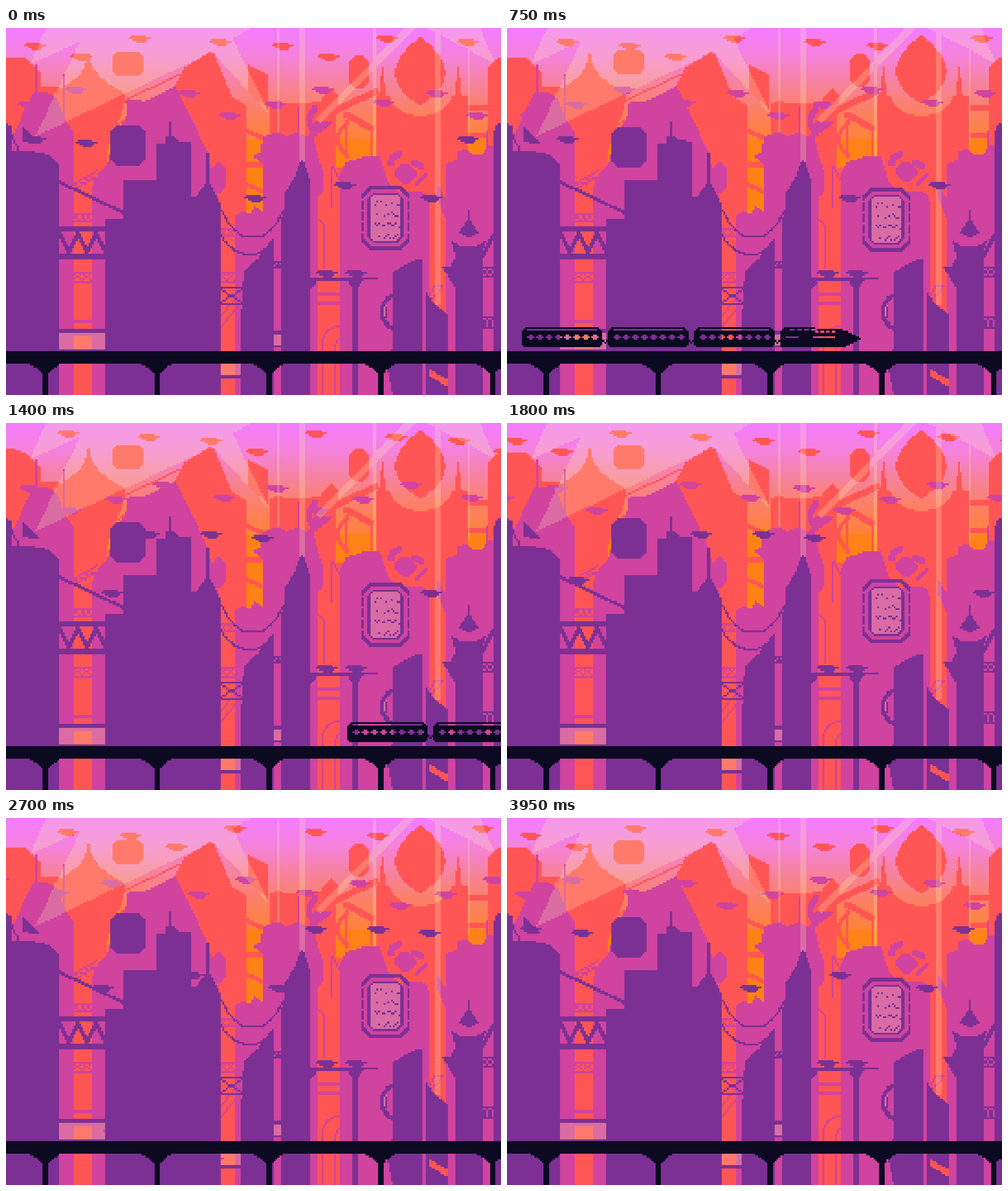
Recreate the animation shown at these times as an HTML page with a canvas. Size 869 px wide and 644 px high, loop 4000 ms.

```html
<!DOCTYPE html>
<html lang="en">
<head>
<meta charset="utf-8">
<title>Sunset city</title>
<style>
html, body { margin: 0; width: 100%; height: 100%; overflow: hidden; background: #7c3094; }
canvas { display: block; width: 100vw; height: 100vh; image-rendering: pixelated; }
</style>
</head>
<body>
<canvas id="stage" width="270" height="200"></canvas>
<script>
// Shapes use stage pixels; P is the size of one art pixel.
const W = 270, H = 200, P = 3.2195, LOOP = 4000, TICK = 50, BOTTOM = 644;
const RED = '#ff5555', PINK = '#d0439f', PURPLE = '#7c3094', BLACK = '#0c0a20';
const view = document.getElementById('stage').getContext('2d');
let g = view;

const px = v => Math.round(v / P);

function layer(color, paint, w = W, h = H) {
  const cv = document.createElement('canvas');
  cv.width = w; cv.height = h;
  g = cv.getContext('2d');
  g.fillStyle = color;
  paint();
  g = view;
  return cv;
}

function carve(paint) {
  g.globalCompositeOperation = 'destination-out';
  paint();
  g.globalCompositeOperation = 'source-over';
}

// Hard-edged polygon fill
function poly(...p) {
  const n = p.length;
  for (let j = 0; j < H; j++) {
    const y = (j + .5) * P, xs = [];
    for (let i = 0; i < n; i += 2) {
      const x1 = p[i], y1 = p[i + 1], x2 = p[(i + 2) % n], y2 = p[(i + 3) % n];
      if ((y1 <= y) !== (y2 <= y)) xs.push(x1 + (y - y1) * (x2 - x1) / (y2 - y1));
    }
    xs.sort((a, b) => a - b);
    for (let k = 0; k + 1 < xs.length; k += 2) {
      const a = px(xs[k]), b = px(xs[k + 1]);
      if (b > a) g.fillRect(a, j, b - a, 1);
    }
  }
}

// Skyline that runs down to the bottom of the stage
const ridge = (...p) => poly(p[0], BOTTOM, ...p, p[p.length - 2], BOTTOM);

function box(x1, y1, x2, y2 = BOTTOM) {
  const a = px(x1), b = px(y1);
  g.fillRect(a, b, Math.max(1, px(x2) - a), Math.max(1, px(y2) - b));
}

// Symmetric shape; half(v) is its half width from top (v = 0) to foot (v = 1)
function profile(cx, y1, y2, half) {
  for (let j = px(y1); j < px(y2); j++) {
    const h = half(((j + .5) * P - y1) / (y2 - y1)), a = px(cx - h);
    g.fillRect(a, j, px(cx + h) - a, 1);
  }
}

function octagon(x1, y1, x2, y2, c) {
  const w = (x2 - x1) / 2, h = y2 - y1;
  profile(x1 + w, y1, y2, v => w - Math.max(0, c - Math.min(v, 1 - v) * h));
}

function line(w, ...p) {
  const mid = (w - 1) / 2;
  for (let i = 0; i + 3 < p.length; i += 2) {
    const x = p[i] / P, y = p[i + 1] / P, dx = p[i + 2] / P - x, dy = p[i + 3] / P - y;
    const n = Math.ceil(Math.max(Math.abs(dx), Math.abs(dy))) || 1;
    for (let k = 0; k <= n; k++)
      g.fillRect(Math.floor(x - mid + dx * k / n), Math.floor(y - mid + dy * k / n), w, w);
  }
}

function brace(x1, y1, x2, y2, n = 2) {
  box(x1, y1, x2, y1 + 3);
  box(x1, y2 - 3, x2, y2);
  const s = (x2 - x1) / n;
  for (let a = x1; a < x2 - 1; a += s) {
    line(1, a, y1 + 3, a + s - 2, y2 - 4);
    line(1, a, y2 - 4, a + s - 2, y1 + 3);
  }
}

function curve(w, n, at) {
  line(w, ...Array.from({ length: n + 1 }, (_, i) => at(i / n)).flat());
}

function cable(x1, y1, x2, y2, drop) {
  curve(1, 24, u => [x1 + (x2 - x1) * u, y1 + (y2 - y1) * u + drop * (1 - Math.abs(2 * u - 1) ** 2.5)]);
}

function hull(x, y) {
  g.fillRect(x + 1, y, 8, 1);
  g.fillRect(x, y + 1, 12, 1);
  g.fillRect(x + 2, y + 2, 8, 1);
  g.fillRect(x + 4, y + 3, 5, 1);
}

const moor = (cx, cy) => hull(px(cx) - 6, px(cy) - 2);

// Each ship repeats every `gap` art pixels, so the fleet loops seamlessly.
function fleet(ships, gap, move) {
  for (const [cx, cy] of ships) {
    const first = (px(cx) + Math.round(move)) % gap - gap;
    for (let x = first; x < W + 6; x += gap) hull(x - 6, px(cy) - 2);
  }
}

const sky = layer('#ff8216', () => {
  const end = px(197), grad = g.createLinearGradient(0, 0, 0, end);
  ['#f37cff', '#f582dc', '#f7829c', '#fc8062', '#ff8238'].forEach((c, i) => grad.addColorStop(i / 4, c));
  g.fillRect(0, 0, W, H);
  g.fillStyle = grad;
  g.fillRect(0, 0, W, end);
});

const redCity = layer(RED, () => {
  poly(0, 52, 35, 52, 61, 79, 61, 112, 0, 112);
  box(0, 104, 93);
  profile(145, 45, 115, v => 2 + 62 * v ** 2.2);
  profile(145, 115, 235, v => 31 + 33 * (1 + Math.cos(Math.PI * v)) / 2);
  box(93, 235, 181);
  line(1, 210, 126, 303, 82);
  line(1, 188, 172, 212, 160);
  ridge(181, 235, 296, 103, 312, 70, 358, 42, 366, 46, 397, 121, 421, 135);
  poly(424, 64, 460, 82, 460, 142, 424, 112);
  for (const y of [176, 270]) poly(421, y, 452, y + 13, 452, y + 22, 421, y + 8);
  box(421, 235, 452, 245);
  box(421, 325, 470);
  ridge(463, 134, 478, 126, 490, 132, 550, 130, 570, 106, 582, 117, 578, 250);
  carve(() => box(578, 140, 650, 235));
  line(3, 560, 165, 584, 142, 648, 112);
  line(3, 598, 152, 643, 176);
  curve(2, 12, u => [600 - 18 * Math.sin(Math.PI * u), 165 + 60 * u]);
  box(597, 174, 600, 220);
  box(640, 172, 643, 225);
  box(452, 245, 650);
  for (const x of [661, 794]) profile(x, 67, 148, v => 1.5 + 9 * v ** 1.3);
  box(650, 120, 811);
  carve(() => profile(728, 60, 154, v => 60 * Math.sqrt(1 - v ** 4)));
  for (const y of [135, 183]) box(811, y, 848, y + 10);
  box(811, 232, 869);
  ridge(847, 70, 865, 52, 869, 52);
});

const pinkCity = layer(PINK, () => {
  ridge(0, 185, 14, 184, 48, 113, 72, 112, 90, 125, 103, 160, 119, 183);
  box(51, 65, 55, 115);
  box(100, 82, 103, 165);
  ridge(151, 280, 162, 255, 180, 235, 186, 190, 210, 160, 215, 127, 240, 130, 298, 103, 355, 220, 376, 310);
  octagon(362, 235, 385, 291, 11);
  ridge(402, 330, 415, 321, 430, 326, 436, 312, 450, 322, 450, 240, 434, 225, 446, 218, 452, 190,
    478, 181, 492, 190, 512, 183, 530, 190, 537, 178, 548, 225, 556, 250, 556, 286, 547, 300);
  box(512, 138, 516, 190);
  curve(3, 8, u => [543 - 10 * Math.sin(Math.PI * u), 140 + 45 * u]);
  poly(540, 165, 575, 164, 552, 184, 540, 185);
  ridge(586, 258, 598, 235, 628, 226, 656, 226, 671, 270, 690, 290, 722, 285, 740, 292, 744, 310);
  poly(757, 274, 773, 300, 773, 335, 757, 300);
  ridge(773, 237, 792, 232, 792, 215, 812, 213, 820, 224, 838, 221, 846, 206, 869, 206);
  box(843, 180, 846, 215);
  line(3, 676, 238, 677, 228, 690, 222);
  line(3, 717, 236, 730, 242);
  line(2, 722, 273, 736, 259);
  for (const y of [0, 10]) line(1, 119, 274 + y, 160, 251 + y);
  for (let x = 122; x < 155; x += 9) line(1, x, 340 - x * .53, x + 8, 344 - x * .53);
  box(119, 512, 151, 518);
  box(119, 535, 151, 541);
  brace(119, 325, 151, 340, 3);
  brace(119, 428, 151, 446);
  brace(376, 351, 402, 368);
  brace(376, 428, 402, 446);
  for (const y of [508, 526]) line(1, 376, y, 402, y - 32);
  box(571, 243, 574, 316);
  line(1, 574, 243, 587, 268);
  line(1, 547, 333, 558, 346, 558, 420);
  for (const y of [463, 479]) box(547, y, 586, y + 6);
  for (const [x, y] of [[555, 523], [576, 545]]) {
    curve(1, 10, u => [586 - (586 - x) * Math.sin(u * Math.PI / 2), y + 32 * (1 - Math.cos(u * Math.PI / 2))]);
    box(x, y + 32, x + 3);
  }
  line(1, 744, 470, 752, 452, 767, 452, 748, 476);
});

const glow = layer('rgb(255,255,180)', () => {
  poly(70, 0, 432, 0, 398, 18, 463, 152, 362, 42, 52, 190, 130, 24, 42, 64);
  poly(82, 116, 97, 108, 97, 138);
  poly(700, 0, 719, 0, 553, 168, 545, 160);
  poly(737, 0, 832, 0, 859, 62);
  for (const [x, w, y] of [[476, 4, 185], [515, 10, 240], [644, 6, 225], [753, 10, 486], [811, 3, 205]])
    box(x, 0, x + w, y);
  box(93, 535, 174, 563);
  box(376, 589, 412, 608);
  box(470, 538, 483, 557);
  box(657, 487, 670, 509);
});

const front = layer(PURPLE, () => {
  ridge(0, 168, 8, 170, 10, 215, 50, 217, 75, 222, 93, 240);
  line(1, 10, 188, 22, 215);
  poly(29, 172, 60, 204, 29, 200);
  for (const y of [268, 271]) line(1, 93, y, 206, y + 55);
  ridge(174, 336, 206, 334, 206, 267, 264, 267, 264, 203, 281, 203, 281, 191, 295, 191, 306, 200, 325, 200,
    325, 296, 334, 296, 350, 273, 358, 273, 376, 306);
  box(286, 164, 290, 195);
  box(351, 218, 357, 275);
  for (const y of [348, 396]) box(93, y, 174, y + 9);
  curve(2, 5, u => [94 + 80 * u, u * 5 % 2 ? 392 : 362]);
  box(93, 528, 174, 535);
  box(93, 563, 174, 567);
  cable(379, 320, 487, 320, 47);
  cable(377, 362, 469, 372, 30);
  brace(376, 454, 418, 487, 1);
  box(376, 608, 412, 615);
  ridge(412, 520, 418, 427, 445, 402, 470, 368);
  brace(470, 409, 483, 422);
  box(470, 531, 483, 538);
  box(470, 557, 483, 561);
  ridge(483, 335, 489, 318, 489, 290, 505, 265, 517, 233, 522, 233, 534, 266);
  box(534, 437, 620, 444);
  box(620, 437, 654, 441);
  poly(534, 441, 549, 441, 534, 460);
  profile(613, 441, 456, v => 16 - 12 * v);
  box(608, 456, 617);
  moor(563, 432);
  moor(614, 432);
  ridge(668, 590, 679, 560, 679, 428, 718, 407, 730, 405);
  carve(() => poly(660, 590, 668, 590, 679, 644, 660, 644));
  curve(2, 12, u => [679 - 19 * Math.sin(Math.PI * u) ** .6, 469 + 58 * u]);
  box(667, 488, 670, 509);
  ridge(737, 460, 750, 482, 775, 502);
  g.fillStyle = RED;
  poly(743, 599, 775, 616, 775, 629, 743, 611);
  g.fillStyle = PURPLE;
  ridge(788, 455, 767, 420, 781, 420, 789, 402, 782, 372, 799, 383, 826, 383, 843, 372, 837, 390);
  profile(812.5, 318, 367, v => 2 + 15 * (v < .85 ? Math.max(0, v / .5 - .7) : (1 - v) / .15));
  ridge(856, 188, 862, 168, 869, 168);
  line(2, 838, 400, 855, 365);
  brace(837, 419, 856, 438);
  brace(837, 506, 856, 529);
});

const rail = layer(BLACK, () => {
  box(0, 567, 869, 589);
  for (let x = 69; x < 869; x += 196.3) {
    profile(x, 587, 608, v => 5 + 29 * (1 - v) ** 1.7);
    box(x - 5, 605, x + 5);
  }
});

// Windows are cut out so the city shows through.
const train = layer(BLACK, () => {
  for (let x = 0; x < 141; x += 47) {
    g.fillRect(x + 2, 0, 40, 1);
    g.fillRect(x + 1, 1, 42, 10);
    g.fillRect(x, 2, 44, 8);
    g.clearRect(x + 3, 1, 38, 1);
    for (let a = x + 3; a < x + 40; a += 5) {
      g.clearRect(a, 5, 4, 1);
      g.clearRect(a + 1, 4, 2, 3);
    }
    for (let k = 0; k < 3; k++) g.fillRect(x + 44 + k, 7 + k % 2, 1, 1);
  }
  for (let y = 0; y < 11; y++) {
    const tail = 143 - Math.min(y, 2);
    const nose = y < 6 ? 160 + 25 * (y / 6) ** .3 : 185 - 2 * (y - 6);
    g.fillRect(tail, y, Math.round(nose) - tail, 1);
  }
  for (let k = 0; k < 4; k++) {
    g.clearRect(146 + k * 4, 1, 3, 1);
    g.clearRect(160 + k * 3, 2, 2, 1);
  }
  g.clearRect(144, 5, 7, 1);
  g.clearRect(159, 5, 12, 1);
}, 190, 11);

const sign = layer(PURPLE, () => {
  octagon(625, 277, 708, 389, 14);
  carve(() => {
    octagon(629, 284, 704, 382, 13);
    for (let y = 300; y < 370; y += 19) box(625, y, 708, y + 3);
  });
  octagon(635, 289, 698, 377, 10);
  g.fillStyle = '#d96ca5';
  octagon(640, 293, 692, 373, 6);
  g.fillStyle = PURPLE;
  let seed = 7;
  const rnd = () => (seed = seed * 16807 % 2147483647) / 2147483647;
  for (let y = 302; y < 365; y += 19.7)
    for (let x = 646; x < 688; x += P)
      if (rnd() < .62) g.fillRect(px(x), px(y) + Math.floor(rnd() * 3), 1, 1);
});

const redShips = [[235, 18], [376, 25], [51, 31], [132, 50]];
const pinkShips = [[122, 108], [323, 115], [40, 134], [230, 131], [392, 153]];
const purpleShips = [[142, 202], [51, 196], [811, 196], [437, 299], [747, 299], [595, 276]];

function draw(t) {
  const u = t / LOOP, go = W * u + 4.3 * Math.sin(Math.PI * u * u);
  const turn = Math.floor(t / 200) * Math.PI / 2;
  const bob = -Math.round(Math.sin(turn)), sway = Math.round(Math.cos(turn)) * P;
  const put = (cv, x = 0, y = 0) => g.drawImage(cv, x, y);

  put(sky);
  g.fillStyle = RED;
  octagon(187, 38.6 + sway, 241, 80.5 + sway, 8);
  octagon(602, 45 + sway, 637, 103 + sway, 10);
  profile(727.5, 13 + sway, 131 + sway, v => 44 * Math.sin(Math.PI * v ** 1.1) ** .75);
  put(redCity);
  fleet(redShips, W / 2, go);

  put(pinkCity);
  g.fillStyle = PINK;
  const drift = Math.cos(2 * Math.PI * u) > .8 ? P : 0;
  octagon(681, 235 + drift, 721, 270 + drift, 14);
  fleet(pinkShips, W / 2, go / 2);

  g.globalAlpha = .22;
  put(glow);
  g.globalAlpha = 1;
  // Two low ships, seen only through the gaps between towers
  if (t > 2100 && t < 3200) {
    const x = (t - 2200) * .2173;
    moor(81 + x, 551);
    moor(364 + x - 109, 600);
  }

  put(front);
  g.fillStyle = PURPLE;
  octagon(183, 170.5 + bob * P, 245, 241.5 + bob * P, 12);
  put(sign, 0, bob);
  fleet(purpleShips, W, go);
  put(train, Math.round(8 + (t - 750) / TICK * 13.7), 163);
  put(rail);
}

const start = performance.now();
function frame() {
  const t = (performance.now() - start) % LOOP;
  draw(Math.floor(t / TICK) * TICK);
  requestAnimationFrame(frame);
}
frame();
</script>
</body>
</html>
```
